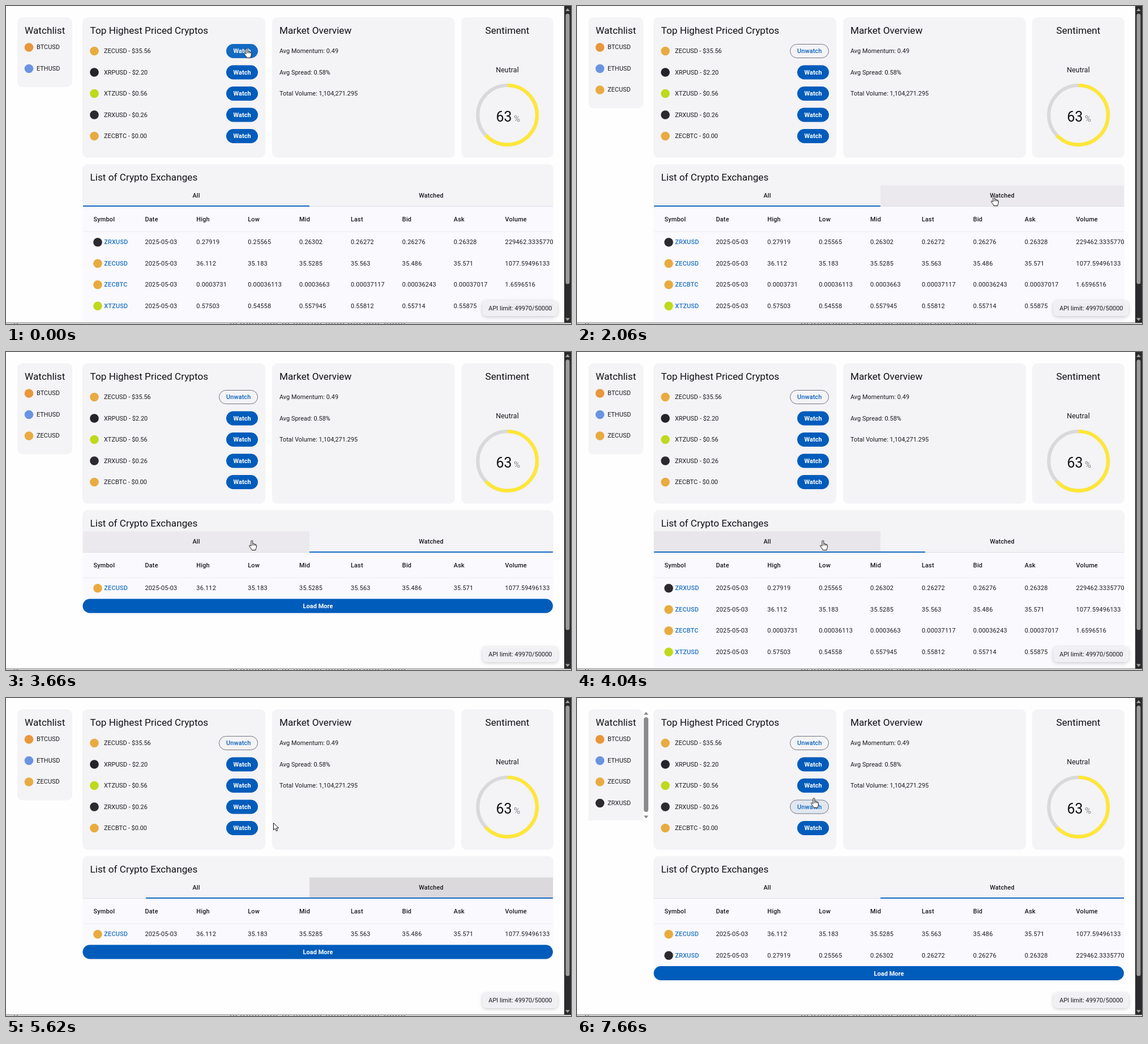
An HTML page with a canvas that plays this animation: 998 px wide and 561 px high, repeating every 8000 ms.

```html
<!DOCTYPE html>
<html lang="en">
<head>
<meta charset="utf-8">
<title>Crypto dashboard</title>
<style>
html, body { margin: 0; width: 100%; height: 100%; overflow: hidden; background: #fff; }
canvas { display: block; width: 100%; height: 100%; }
</style>
</head>
<body>
<canvas id="stage"></canvas>
<script>
const W = 998, H = 561, LOOP = 8000;
const canvas = document.getElementById('stage');
const ctx = canvas.getContext('2d');

const BLUE = '#005cbb', INK = '#1a1b1f', CARD = '#f4f3f6', TABLE = '#faf9fd';
const COIN = { BTC: '#e8973a', ETH: '#6a94e0', ZEC: '#e8ab40', XRP: '#25232a', XTZ: '#bfd91c', ZRX: '#2c2a2e' };
const PRICES = [['ZECUSD', '35.56'], ['XRPUSD', '2.20'], ['XTZUSD', '0.56'], ['ZRXUSD', '0.26'], ['ZECBTC', '0.00']];
const HEADS = 'Symbol Date High Low Mid Last Bid Ask Volume'.split(' ');
const QUOTES = {
  ZRXUSD: '0.27919 0.25565 0.26302 0.26272 0.26276 0.26328 229462.33357706',
  ZECUSD: '36.112 35.183 35.5285 35.563 35.486 35.571 1077.59496133',
  ZECBTC: '0.0003731 0.00036113 0.0003663 0.00037117 0.00036243 0.00037017 1.6596516',
  XTZUSD: '0.57503 0.54558 0.557945 0.55812 0.55714 0.55875 26186.83150913'
};
const ALL = Object.keys(QUOTES);
const ROW = 37.5, SPLIT = 536, LEFT = 136, RIGHT = 966;

// Each step overrides part of the previous state.
const STEPS = [
  { at: 0, x: 420, y: 74, hand: true, button: 0, tabHover: -1, tint: '#ebe9ee', tab: 0, line: [LEFT, SPLIT], watched: [] },
  { at: 1220, watched: ['ZECUSD'] },
  { at: 1660, x: 585, y: 210, hand: false, button: -1 },
  { at: 2060, x: 731, y: 335, hand: true, tabHover: 1 },
  { at: 2460, tab: 1, line: [SPLIT, RIGHT], tint: '#e4e2e7' },
  { at: 2860, tint: '#ebe9ee' },
  { at: 3280, x: 640, y: 334 },
  { at: 3660, x: 429, y: 332, tabHover: 0 },
  { at: 4040, tab: 0, line: [LEFT, 615], tint: '#e8e6ea' },
  { at: 4420, line: [LEFT, SPLIT], tint: '#ebe9ee' },
  { at: 4820, x: 500, y: 334 },
  { at: 5220, x: 640, y: 334, tabHover: 1 },
  { at: 5620, x: 472, y: 220, hand: false, tab: 1, line: [247, RIGHT], tint: '#dbd9dc' },
  { at: 6040, x: 424, y: 198, hand: true, tabHover: -1, line: [SPLIT, RIGHT], button: 3 },
  { at: 6460, x: 420, y: 196 },
  { at: 6870, watched: ['ZECUSD', 'ZRXUSD'] },
  { at: 7660, x: 413, y: 176 }
];

const HAND = new Path2D('M4 10.5V2a1.4 1.4 0 0 1 2.8 0V6.5c.8-.9 2.2-.6 2.5.4.9-.6 2-.1 2.2.7.9-.4 1.8.2 1.8 1.2V12c0 2-1.3 3-1.3 5.5H5.2C5 15 1.5 12.5.7 10.3.3 9 1.8 8.4 2.6 9.4Z');
const ARROW = new Path2D('M.5.5V12.9l3-2.7 2 4.5 2.1-.9-2-4.4h4Z');

function stateAt(t) {
  return Object.assign({}, ...STEPS.filter(s => s.at <= t));
}

function rect(x, y, w, h, fill) {
  ctx.fillStyle = fill;
  ctx.fillRect(x, y, w, h);
}

function round(x, y, w, h, r, fill, stroke) {
  ctx.beginPath();
  ctx.roundRect(x, y, w, h, r);
  if (fill) { ctx.fillStyle = fill; ctx.fill(); }
  if (stroke) { ctx.strokeStyle = stroke; ctx.lineWidth = 1; ctx.stroke(); }
}

// y is the middle of the capitals
function text(str, x, y, { size = 10.94, weight = 400, color = INK, align = 'left', gap = 0 } = {}) {
  ctx.font = `${weight} ${size}px Roboto, sans-serif`;
  ctx.letterSpacing = gap + 'px';
  ctx.textAlign = align;
  ctx.fillStyle = color;
  ctx.fillText(str, x, y + size * 0.356);
}

function title(str, x, y, align) {
  text(str, x, y, { size: 17.19, color: '#111216', align });
}

function dot(pair, x, y) {
  ctx.beginPath();
  ctx.arc(x, y, 7.8, 0, Math.PI * 2);
  ctx.fillStyle = COIN[pair.slice(0, 3)];
  ctx.fill();
}

function triangle(x, y, dir, color) {
  ctx.beginPath();
  ctx.moveTo(x - 4, y + 2.5 * dir);
  ctx.lineTo(x + 4, y + 2.5 * dir);
  ctx.lineTo(x, y - 2.5 * dir);
  ctx.fillStyle = color;
  ctx.fill();
}

function drawWatchlist(s) {
  const pairs = ['BTCUSD', 'ETHUSD', ...s.watched];
  const full = pairs.length > 3;
  const h = full ? 196 : 48 + ROW * pairs.length;
  round(20, 20, 97, h, full ? [9, 9, 0, 0] : 9, CARD);
  title('Watchlist', 33, 43);
  pairs.forEach((p, i) => {
    const y = 72.5 + ROW * i;
    dot(p, 40.5, y + 0.5);
    text(p, 54, y);
  });
  if (full) {
    triangle(122, 27, 1, '#858585');
    round(118, 34, 8, 167, 4, '#8b8b8b');
    triangle(122, 210, -1, '#858585');
  }
}

function drawButton(y, on, hover) {
  const label = { align: 'center', gap: 0.08 };
  if (on) {
    round(376.5, y - 12, 68, 24, 12, hover ? '#e0e7f1' : null, '#74777f');
    text('Unwatch', 410.7, y, { ...label, weight: 500, color: '#0b62bd' });
  } else {
    round(389, y - 12.5, 56, 25, 12.5, hover ? '#146ac1' : BLUE);
    text('Watch', 417.2, y, { ...label, weight: 700, color: '#fff' });
  }
}

function drawPrices(s) {
  round(135, 20, 323, 247.5, 9, CARD);
  title('Top Highest Priced Cryptos', 148.5, 43);
  PRICES.forEach(([pair, price], i) => {
    const y = 79.5 + ROW * i;
    dot(pair, 156, y);
    text(`${pair} - $${price}`, 173, y);
    drawButton(y, s.watched.includes(pair), s.button === i);
  });
}

function drawOverview() {
  round(470, 20, 323, 247.5, 9, CARD);
  title('Market Overview', 483, 43);
  ['Avg Momentum: 0.49', 'Avg Spread: 0.58%', 'Total Volume: 1,104,271.295']
    .forEach((line, i) => text(line, 483, 79.5 + ROW * i));
}

function ring(part, color) {
  const top = -Math.PI / 2;
  ctx.beginPath();
  ctx.arc(885.7, 192.3, 52.3, top, top + Math.PI * 2 * part);
  ctx.strokeStyle = color;
  ctx.lineWidth = 6.2;
  ctx.stroke();
}

function drawSentiment() {
  round(804, 20, 163, 247.5, 9, CARD);
  title('Sentiment', 885.5, 43, 'center');
  text('Neutral', 885.5, 112.5, { size: 12.5, align: 'center' });
  ring(1, '#d9d9da');
  ring(0.63, '#ffe737');
  text('63', 865.5, 195.5, { size: 25, color: '#111' });
  text('%', 897, 198.5, { size: 15, weight: 300, color: '#55555a' });
}

function drawTabs(s) {
  if (s.tabHover === 0) rect(LEFT, 316.5, SPLIT - LEFT, 37, s.tint);
  if (s.tabHover === 1) rect(SPLIT, 316.5, RIGHT - SPLIT, 37, s.tint);
  const label = { weight: 500, align: 'center', gap: 0.08 };
  text('All', 336, 334.5, label);
  text('Watched', 751, 334.5, label);
  rect(LEFT, 353, RIGHT - LEFT, 1, '#dfe1ea');
  rect(s.line[0], 352, s.line[1] - s.line[0], 1.8, BLUE);
}

function drawTable(s) {
  const rows = s.tab ? s.watched : ALL;
  const end = s.tab ? 398 + ROW * rows.length + 50 : 558;
  const column = i => 154.6 + 90.87 * i;
  ctx.save();
  ctx.beginPath();
  ctx.roundRect(135, 279, 832, end - 279, s.tab ? [9, 9, 13, 13] : [9, 9, 0, 0]);
  ctx.clip();
  rect(135, 279, 832, 75, CARD);
  rect(135, 354, 832, s.tab ? 44 + ROW * rows.length + 6 : 204, TABLE);
  title('List of Crypto Exchanges', 148.5, 301.5);
  drawTabs(s);
  HEADS.forEach((h, i) => text(h, column(i), 376, { weight: 500, gap: 0.16 }));
  rect(LEFT, 397.5, RIGHT - LEFT, 1, '#ecebf1');
  rows.forEach((pair, i) => {
    const y = 416.2 + ROW * i;
    dot(pair, 162, y + 0.5);
    text(pair, 173.3, y, { weight: 500, gap: 0.16, color: '#1f73c5' });
    ['2025-05-03', ...QUOTES[pair].split(' ')]
      .forEach((v, k) => text(v, column(k + 1), y, { gap: 0.175 }));
  });
  ctx.restore();
  if (s.tab) {
    const y = 398 + ROW * rows.length;
    round(135.5, y, 830.5, 25, 12.5, BLUE);
    text('Load More', 551, y + 12.7, { weight: 700, color: '#fff', align: 'center', gap: 0.08 });
  }
}

function drawToast() {
  ctx.save();
  ctx.shadowColor = 'rgba(0,0,0,.22)';
  ctx.shadowBlur = 6;
  ctx.shadowOffsetY = 1.5;
  round(841.5, 520, 133, 27, 7, 'rgba(244,243,248,.93)');
  ctx.restore();
  text('API limit: 49970/50000', 852.3, 533.5);
}

function drawWindow() {
  rect(0, 558, W, 3, '#d2d2d4');
  rect(0, 558, W, 1, '#999');
  [[14, 3], [19, 2], [396, 14], [414, 6], [425, 22], [452, 30], [488, 14], [508, 26], [540, 20], [565, 34], [604, 22], [632, 30], [668, 36]]
    .forEach(([x, w]) => {
      for (let k = 0; k < w; k += 5) rect(x + k, 560, 2, 1, '#55555c');
    });
  rect(986, 0, 12, 559, '#2b2b2d');
  triangle(992, 6.5, 1, '#a0a0a0');
  round(988.5, 13.5, 7, 477, 3.5, '#9c9c9c');
  triangle(992, 553, -1, '#a0a0a0');
}

function drawCursor(s) {
  const shape = s.hand ? HAND : ARROW;
  ctx.save();
  ctx.translate(s.x, s.y);
  ctx.fillStyle = '#fff';
  ctx.fill(shape);
  ctx.strokeStyle = '#111';
  ctx.lineWidth = 1;
  ctx.lineJoin = 'round';
  ctx.stroke(shape);
  if (s.hand) {
    ctx.beginPath();
    for (const x of [6.8, 9.3, 11.5]) {
      ctx.moveTo(x, 7);
      ctx.lineTo(x, 9.5);
    }
    ctx.stroke();
  }
  ctx.restore();
}

function draw(t) {
  const s = stateAt(t);
  rect(0, 0, W, H, '#fefefe');
  drawWatchlist(s);
  drawPrices(s);
  drawOverview();
  drawSentiment();
  drawTable(s);
  drawToast();
  drawWindow();
  drawCursor(s);
}

function resize() {
  canvas.width = Math.round(innerWidth * devicePixelRatio);
  canvas.height = Math.round(innerHeight * devicePixelRatio);
}

let start;
function tick(now) {
  start ??= now;
  ctx.setTransform(canvas.width / W, 0, 0, canvas.height / H, 0, 0);
  draw((now - start) % LOOP);
  requestAnimationFrame(tick);
}

addEventListener('resize', resize);
resize();
requestAnimationFrame(tick);
</script>
</body>
</html>
```
